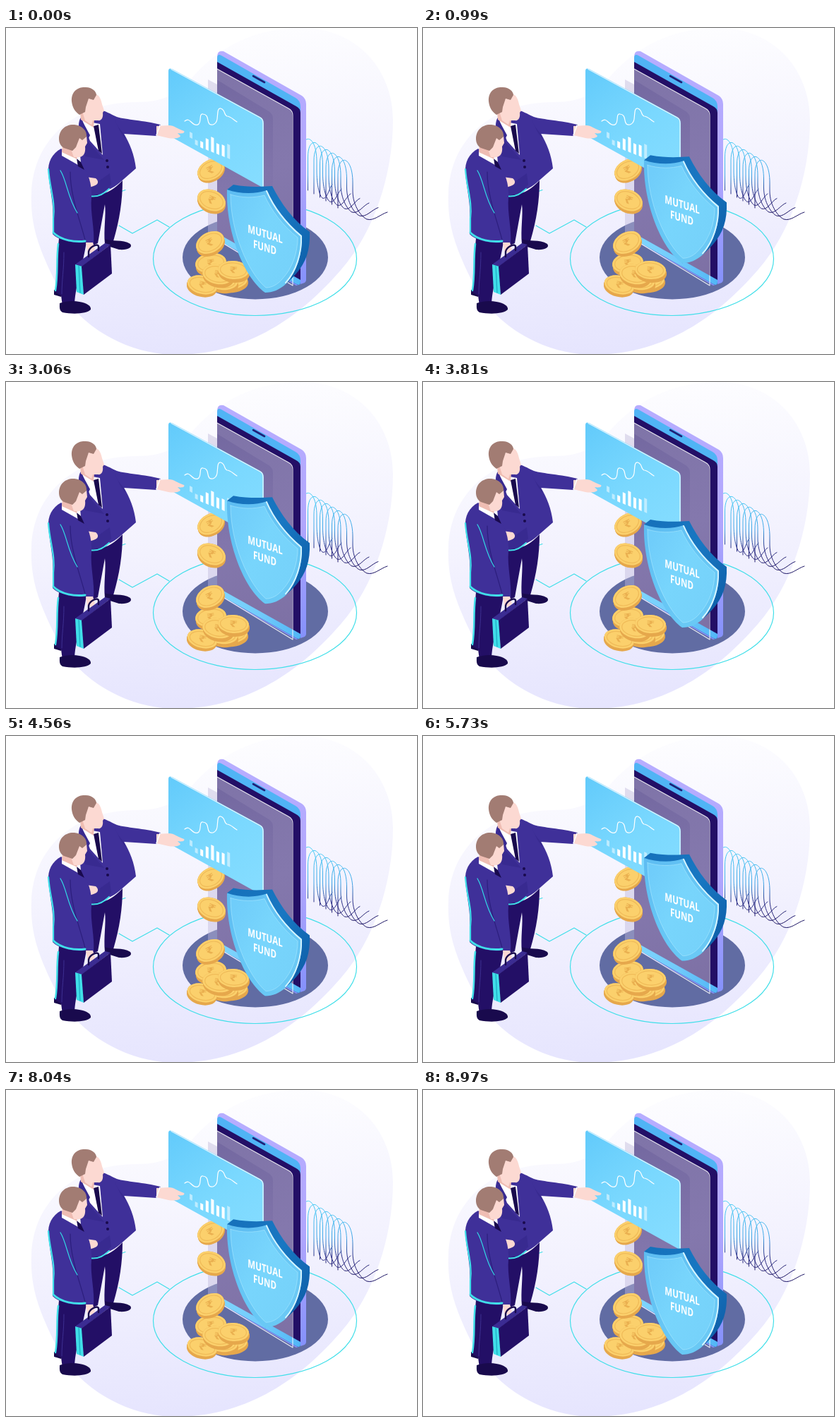
An HTML page with a canvas for the animation above (9000 ms loop, 582 px wide and 462 px high).

```html
<!DOCTYPE html>
<html lang="en">
<head>
<meta charset="utf-8">
<title>Mutual fund</title>
<style>
html, body { margin: 0; width: 100%; height: 100%; overflow: hidden; background: #fff; }
canvas { display: block; }
</style>
</head>
<body>
<canvas id="stage" width="582" height="462"></canvas>
<script>
const W = 582, H = 462, LOOP = 9000, STEP = 30;
const NAVY = '#230f66', INK = '#190a4d', JACKET = '#3f3099', FOLD = '#382a90';
const SKIN = '#fcd9d2', SHADE = '#efbdb3', HAIR = '#a27c73', TEAL = '#40dfe9';
const FONT = '"Open Sans", "Noto Sans", sans-serif';

// Height of the shield over time: [ms, px]
const KEYS = [[0, 0], [2280, -96], [4410, 0], [6660, -96], [8970, 0], [9000, 0]];

const stage = document.getElementById('stage').getContext('2d');
const scene = document.createElement('canvas');
scene.width = W;
scene.height = H;
let g = scene.getContext('2d');

function fill(d, color) {
  g.fillStyle = color;
  g.fill(new Path2D(d));
}

function line(d, color, width = 1) {
  g.strokeStyle = color;
  g.lineWidth = width;
  g.lineCap = g.lineJoin = 'round';
  g.stroke(new Path2D(d));
}

function ramp(x0, y0, x1, y1, ...colors) {
  const r = g.createLinearGradient(x0, y0, x1, y1);
  colors.forEach((c, i) => r.addColorStop(i / (colors.length - 1), c));
  return r;
}

function oval(x, y, rx, ry, color, turn = 0) {
  g.beginPath();
  g.ellipse(x, y, rx, ry, turn, 0, Math.PI * 2);
  g.fillStyle = color;
  g.fill();
}

function ring(x, y, rx, ry, color, width, turn = 0) {
  g.beginPath();
  g.ellipse(x, y, rx, ry, turn, 0, Math.PI * 2);
  g.strokeStyle = color;
  g.lineWidth = width;
  g.stroke();
}

function ground() {
  g.fillStyle = '#fff';
  g.fillRect(0, 0, W, H);
  fill('M36 235C38 160 95 105 185 105C225 105 245 92 262 72C300 28 350 0 418 0' +
    'C500 0 548 62 548 130C548 210 520 290 475 342C425 400 350 463 240 463' +
    'C180 463 110 430 75 370C50 320 34 285 36 235Z',
    ramp(270, 10, 320, 450, '#fdfdff', '#f3f2fe', '#e6e5fe'));
  line('M162 232L169 229.5M160 280L179 291L214 272L231 282', TEAL, 1.2);
  ring(352.5, 327, 144, 80.5, TEAL, 1.2);
  oval(353, 325, 103, 59.5, '#616ca3');
}

function waves() {
  const tint = ramp(0, 155, 0, 262, '#45cff6', '#46bdf0', '#3fa5e6', '#2b2f86', '#1c1464');
  for (let i = 0; i < 7; i++) {
    const left = 419 + i * 8.5, leg = 440 + i * 8.5, top = 153 + i * 5;
    line(`M${left} ${top + 72}V${top + 25}C${left} ${top - 6} ${leg} ${top - 2} ${leg} ${top + 36}` +
      `V${top + 48}C${leg} ${top + 70} ${444 + i * 10} ${238 + i * 5} ${448 + i * 10.5} ${241 + i * 5}` +
      `C${455 + i * 11} ${244 + i * 5} ${458 + i * 12} ${225 + i * 6.5} ${462 + i * 13} ${222 + i * 6.5}`, tint, 1);
  }
}

function phone() {
  fill('M299 41Q299 31 308 33L419 96Q425 100 425 108V357Q425 361 420 362L411 365L299 301Z',
    ramp(0, 40, 0, 365, '#b7adff', '#b1a6fd', '#8491fb'));
  fill('M299 43Q299 36 305 39L410 99Q417 103 417 111V130L299 70Z', '#50b4f5');
  fill('M299 48L411 111Q417 114 417 120V360Q417 366 411 363L299 300Z', NAVY);
  line('M350 68L366 77', '#1f2179', 2.6);
  fill('M299 58L400 114Q405 117 405 124V356L299 296Z',
    ramp(299, 60, 405, 360, '#7f74a8', '#8478ad', '#7d70a4'));
  fill('M299 73.5L372 118Q378 122 378 128V338L299 295Z',
    ramp(0, 80, 0, 260, 'rgba(62,50,125,.17)', 'rgba(62,50,125,0)'));
  fill('M286 73L299 80V297L286 290Z', 'rgba(190,185,217,.45)');
  fill('M299 291L417 357V360Q417 366 411 363L299 300Z',
    ramp(299, 0, 417, 0, '#7fd6fd', '#72cbfb', '#52b6f6'));
  line('M299 58L400 114Q406 117 406 124V365L286 292', 'rgba(255,255,255,.85)', 1.1);
}

function coin(x, y, rx, ry, deg, dx = 1, dy = 5) {
  const turn = deg * Math.PI / 180;
  for (let k = 1; k >= 0; k -= .2) oval(x + dx * k, y + dy * k, rx, ry, '#e6a84c', turn);
  oval(x, y, rx, ry, '#fbd06c', turn);
  ring(x, y, rx - 3.5, ry - 3, '#f0bb58', 1.2, turn);
  g.save();
  g.translate(x, y);
  g.rotate(turn);
  g.scale(1, ry / rx);
  g.fillStyle = '#eab050';
  g.font = 'bold 21px "Noto Sans", "DejaVu Sans", sans-serif';
  g.textAlign = 'center';
  g.textBaseline = 'middle';
  g.fillText('₹', 0, 1);
  g.restore();
}

function coins() {
  coin(290, 333, 22, 14, -8);
  coin(289, 304, 21, 14.5, -27, 1, 4);
  coin(320, 358, 22, 12, -6);
  coin(306, 359, 22, 12, 6);
  coin(278, 364, 21.5, 13, 14, -1, 4);
  coin(300, 349, 22, 14, 10);
  coin(322, 343, 22, 13, 4);
  coin(291, 244, 20.5, 14.5, 22, 0, 4);
}

function card() {
  coin(290, 201, 20, 14, -28, 1, 3);
  fill('M230 61Q230 56 235 58L360 126Q365 129 365 135V227L230 152Z',
    ramp(235, 60, 360, 225, '#63cbfb', '#7ad8fe', '#86ddff'));
  line('M234 58.5L360 127Q364 129 364 135V226', 'rgba(255,255,255,.8)', 1.2);
  line('M253 132C257 129 259 130 262 133C266 137 270 139 273 136C277 131 273 121 279 122' +
    'C288 123 284 132 288 136C292 139 298 136 299 129C300 122 299 113 304 114' +
    'C311 116 308 123 313 125C318 125 322 130 327 133', '#fff', 1.2);
  [[147, 155], [158, 165], [160, 169], [156, 172], [154, 175], [163, 178], [165, 181], [164, 184]]
    .forEach(([top, foot], i) => {
      const x = 260 + i * 7.6;
      fill(`M${x} ${top}l4 2V${foot + 2}l-4 -2Z`, i % 7 < 2 ? 'rgba(255,255,255,.5)' : '#fff');
    });
}

function pointingMan() {
  fill('M118 232C135 240 150 232 165 216C165 244 161 272 152 302L140 306C138 285 142 265 140 250L130 305L118 310Z', NAVY);
  fill('M140 299C150 303 165 299 176 306C180 311 172 315 160 314L141 308Z', INK);
  fill('M106 127C101 133 103 150 104 170L110 232C130 240 150 228 160 220L184 199' +
    'C182 180 175 163 167 150L213 153L219 137C195 131 170 130 157 126C148 122 140 117 133 116L124 131Z', JACKET);
  fill('M154 130C157 138 161 144 167 150C173 162 166 158 154 130Z', FOLD);
  fill('M107 128L122 134L133 136L137 180L119 160Z', '#fff');
  fill('M124 139L131 137L136 178L131 174Z', INK);
  fill('M106 128L119 152L115 160L139 187L112 182L104 150Z', FOLD);
  oval(143, 188, 2, 2, INK);
  oval(144, 197, 2, 2, INK);
  fill('M213 139L231 138C238 138 243 143 252 146C254 149 249 150 243 149L247 153C245 157 236 157 230 156L213 152Z', SKIN);
  line('M218 138L213 152', '#fff', 1.6);
  fill('M105 120L113 114L125 130L124 141L106 130Z', SHADE);
  fill('M128 94C133 96 135 103 136 108L139 117L137 120C138 127 135 132 130 131L123 131L121 137L112 131L108 118L113 110L117 100Z', SKIN);
  fill('M93 104C92 88 104 83 113 84C122 84 128 90 128 95L124 102L117 100L113 112L112 119L104 123C97 118 94 112 93 104Z', HAIR);
  fill('M120 225L147 206L149 222L137 235L118 238Z', FOLD);
  line('M118 238C128 240 138 236 146 228', TEAL, 2);
  fill('M113 211L127 213C132 217 131 222 124 224L115 227Z', SKIN);
}

function bagMan() {
  fill('M68 371L79 375L78 381L68 378Z', INK);
  fill('M75 298C72 330 73 350 70 374L78 379L80 394H97C97 370 108 340 114 303Z', NAVY);
  fill('M76 390C85 387 95 386 104 388C115 390 121 394 120 399C115 405 95 406 80 403C75 400 76 395 76 390Z', INK);
  line('M74 306C71 330 74 348 70 372', TEAL, 2.5);
  line('M82 318C82 343 79 357 79 377', '#3d2f91', 1);
  fill('M78 171C65 178 59 190 60 205C62 230 68 250 66 270V292C75 302 100 306 112 304L124 306' +
    'C126 285 119 262 121 240C122 220 116 205 108 195C100 188 88 180 78 171Z', JACKET);
  line('M91 204C91 240 106 275 113 304', '#2c1e7c', 1.2);
  line('M60 200C62 228 70 245 67 270V289', TEAL, 2.2);
  line('M67 290C78 301 98 304 112 302', TEAL, 3);
  line('M77 202C86 216 87 240 101 262', '#32dce7', 1.2);
  fill('M79 173L100 185L102 194L79 181Z', '#fff');
  fill('M100 185L106 190L111 201L102 196Z', INK);
  fill('M80 165L98 171L101 186L79 176Z', SHADE);
  fill('M114 152L115 163L112 168C113 177 110 182 104 183L96 183L92 172L98 164L104 155Z', SKIN);
  fill('M75 157C75 144 85 136 97 137C108 138 115 146 114 154L108 159L104 156L99 169L94 174L82 170C77 167 75 162 75 157Z', HAIR);
  fill('M113 304L123 304L126 314L121 319L115 316Z', SKIN);

  fill('M98 335L140 305L148 307L108 338Z', '#3b2c92');
  fill('M98 335L108 338L110 378L100 374Z', TEAL);
  line('M103 337L105 375', '#1fa9c4', 1.2);
  fill('M107 338L148 307L150 348L110 378Z', NAVY);
  line('M117 324V317C118 311 128 305 131 309V315', INK, 2.4);
}

const FRONT = 'M313 229C330 235 352 236 369 230C379 254 397 277 419 294C420 318 412 345 397 362C388 371 377 375 367 375C337 354 311 288 313 229Z';
const INNER = 'M318 236C334 241 351 241 366 237C376 259 392 280 413 297C413 318 406 340 391 356C385 363 377 368 368 368C343 347 318 289 318 236Z';

function shield() {
  fill('M313 229L322 222C344 226 361 225 377 224C389 248 407 273 430 289C431 314 425 332 411 348' +
    'C399 362 385 373 367 375Z', ramp(320, 225, 430, 330, '#1671bb', '#1877c2', '#0f61ab'));
  fill(FRONT, ramp(313, 240, 420, 340, '#5ebdf2', '#66c6f5', '#6ac9f5'));
  line('M369 231C379 254 397 277 418 295C419 318 411 345 396 361', '#d4f4ff', 2);
  fill(INNER, ramp(318, 260, 415, 310, '#70cdfa', '#78d5fc', '#76d2fa'));
  line(INNER, 'rgba(170,233,255,.6)', 1);
  g.fillStyle = '#fff';
  g.font = `bold 16px ${FONT}`;
  g.textAlign = 'center';
  g.textBaseline = 'alphabetic';
  [['MUTUAL', 367, 297.5], ['FUND', 366.5, 316.5]].forEach(([word, x, y]) => {
    g.save();
    g.transform(.72, .23, 0, 1, x, y);
    g.fillText(word, 0, 0);
    g.restore();
  });
}

function lift(t) {
  const i = KEYS.findIndex(k => k[0] > t);
  const [t0, y0] = KEYS[i - 1], [t1, y1] = KEYS[i];
  return y0 + (y1 - y0) * (t - t0) / (t1 - t0);
}

[ground, waves, phone, coins, card, pointingMan, bagMan].forEach(part => part());
g = stage;
const start = performance.now();

function draw() {
  const t = Math.floor((performance.now() - start) % LOOP / STEP) * STEP;
  g.drawImage(scene, 0, 0);
  g.save();
  g.translate(0, lift(t));
  shield();
  g.restore();
  requestAnimationFrame(draw);
}
draw();
</script>
</body>
</html>
```
